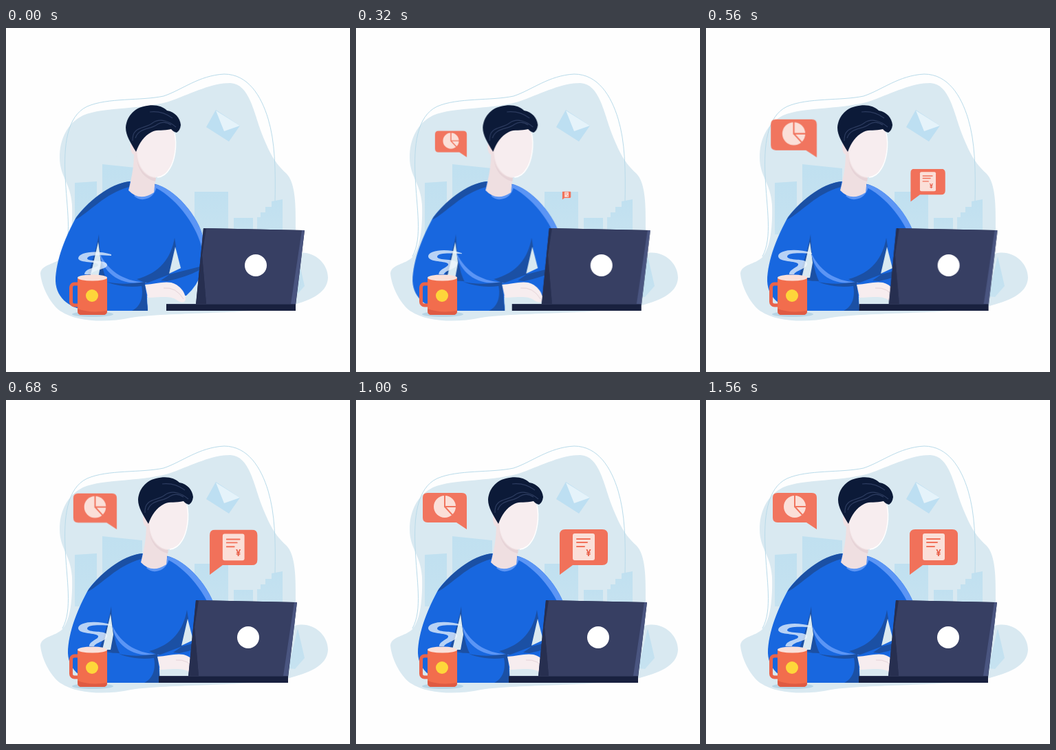
An HTML page that plays this animation: 500x500 px, repeating every 1.6 s.

```html
<!DOCTYPE html>
<html lang="en">
<head>
<meta charset="utf-8">
<title>Working at a laptop</title>
<style>
html, body { margin: 0; width: 100%; height: 100%; overflow: hidden; background: #fefefe; }
svg { display: block; width: 100%; height: 100%; }
.person, .laptop, .bubble, .steam { animation: 1600ms linear infinite; }
.person { animation-name: lean; }
.laptop { animation-name: slide; }
.chart { animation-name: popChart; transform-origin: 161px 187px; }
.bill { animation-name: popBill; transform-origin: 300.5px 248.5px; }
.steam { animation-name: drift; }
@keyframes lean {
  0% { transform: none; animation-timing-function: cubic-bezier(.3, .15, .6, 1); }
  42.5%, 100% { transform: translateX(18px); }
}
@keyframes slide {
  0% { transform: none; animation-timing-function: cubic-bezier(.3, .15, .6, 1); }
  42.5%, 100% { transform: translateX(-11px); }
}
@keyframes popChart {
  0% { transform: scale(0); }
  30.6% { transform: scale(1.1); }
  40% { transform: scale(.98); }
  47.5%, 100% { transform: none; }
}
@keyframes popBill {
  0%, 15% { transform: scale(0); }
  45.6% { transform: scale(1.1); }
  55% { transform: scale(.98); }
  62.5%, 100% { transform: none; }
}
@keyframes drift {
  0%, 100% { d: path("M153 329C130 322 105 326 105 335C107 342 132 339 134 344C135 349 115 348 114 358L124 358C126 351 148 351 147 344C146 336 118 340 118 335C119 329 138 330 153 331Z"); }
  22%, 88% { d: path("M154 327C130 319 104 323 105 332C106 341 132 338 134 343C135 348 121 350 121 358L128 358C130 352 148 350 147 342C146 334 118 339 118 332C119 326 138 327 154 328Z"); }
}
</style>
</head>
<body>
<svg viewBox="0 0 500 500">
  <defs>
    <linearGradient id="tower" x1="0" y1="0" x2="0" y2="1">
      <stop offset="0" stop-color="#c0e0f0"/>
      <stop offset="1" stop-color="#c6e2f0"/>
    </linearGradient>
  </defs>

  <!-- backdrop -->
  <path fill="#d9e9f1" d="M78 188C78 163 88 139 112 127C142 114 204 119 242 105C272 94 299 80 326 80C354 81 360 123 372 154C384 184 391 196 407 211C422 225 421 263 421 292L420 328C444 321 468 340 468 363C467 386 441 397 408 405C350 416 235 413 182 421C145 429 103 427 80 412C66 403 52 378 50 357C51 343 72 344 82 333C94 319 97 287 96 257C94 225 78 216 78 188Z"/>
  <path fill="none" stroke="#b9dbea" d="M82 332C97 305 88 262 86 214C84 172 88 128 118 114C148 101 196 106 229 99C256 90 280 69 317 67C352 67 371 99 381 132C391 165 392 205 391 252"/>
  <g fill="url(#tower)">
    <path d="M100 225L132 223V300H100Z"/>
    <path d="M140 198L198 204V290H140Z"/>
    <path d="M274 238H323V300H274Z"/>
    <path d="M331 276H359V300H331Z"/>
    <path d="M365 275H370V268H377V260H386V252L402 249V300H365Z"/>
    <path d="M424 332L434 375L420 391L410 390Z"/>
  </g>
  <path fill="#bddff2" d="M305 119L340 142L324 165L291 144Z"/>
  <path fill="#e5f3fa" d="M305 120L340 142L317 150Z"/>

  <g class="person">
    <!-- sweater -->
    <path fill="#1867df" d="M180 223C156 225 119 252 102 275C88 300 72 337 72 368C73 394 95 409 122 411H206L205 392L262 389Q279 374 284 354L287 306C280 274 246 233 214 226Z"/>
    <path fill="#1b50a4" d="M180 223C150 226 117 253 100 279C122 268 142 241 179 231Z"/>
    <path fill="#5b95f5" d="M217 227C246 234 280 274 287 306L285 322C280 293 251 249 217 232Z"/>
    <path fill="#1b50a4" d="M245 305C240 334 224 356 190 365L204 371L238 358L247 318Z"/>
    <path fill="#1b50a4" d="M281 347L238 358L225 367L234 368Q262 362 281 352Z"/>
    <path fill="#d9e9f1" d="M246 318L254 349L237 357Z"/>
    <path fill="#1b50a4" d="M135 300C131 322 124 344 117 364L148 370C139 352 136 328 135 300Z"/>
    <path fill="#d9e9f1" d="M134 311L138 341L134 363H122Z"/>
    <path fill="#5b95f5" d="M136 327C141 360 172 376 206 370C176 369 150 357 136 327Z"/>
    <path fill="#1867df" d="M108 371C139 363 166 373 202 370L206 411H122Z"/>
    <path fill="#1b50a4" d="M146 369C170 374 185 371 202 369L206 411H183C196 405 200 390 197 375C182 377 164 376 146 369Z"/>

    <!-- hand -->
    <path fill="#d9e9f1" d="M205 389H262L270 403H206Z"/>
    <path fill="#f7edef" d="M202 373C216 372 229 368 240 370C252 373 261 384 261 394C260 400 255 400 249 396C240 389 229 391 206 392Z"/>
    <path fill="none" stroke="#e5d3d8" d="M229 378Q247 376 258 394"/>

    <!-- head -->
    <path fill="#5b95f5" d="M186 244Q192 250 200 249Q215 247 219 231L214 226Z"/>
    <path fill="#efdfe1" d="M185 166C188 195 183 215 178 236Q194 253 215 239L218 210L193 168Z"/>
    <ellipse cx="186" cy="173" rx="5" ry="11" fill="#f0e0e3"/>
    <path fill="#e6d3d7" d="M190 190C193 207 207 219 218 218L217 223C201 219 192 207 190 190Z"/>
    <path fill="#f7edef" d="M191 170C196 151 218 143 243 148C249 163 247 184 240 201C235 212 227 217 218 217C201 217 187 196 191 170Z"/>
    <path fill="none" stroke="#fff" stroke-width="1.500" d="M245 153C249 171 245 193 238 204Q231 216 220 217"/>
    <path fill="#0c1a38" d="M189 180C181 167 174 156 174 145C175 129 186 117 200 114C215 110 227 113 234 120C246 122 253 131 254 141Q253 149 248 152Q243 151 240 147C229 150 220 147 212 151C200 157 194 167 189 180Z"/>
    <g fill="none" stroke="#2d3c60" stroke-width="1.200">
      <path d="M184 164C183 142 202 147 213 138C224 130 238 136 247 144"/>
      <path d="M188 160C193 144 211 148 220 140Q230 134 240 141"/>
      <path d="M209 122Q227 120 242 131"/>
    </g>
  </g>

  <g class="laptop">
    <path fill="#272f50" d="M287 291L434 294L421 403H276Z"/>
    <path fill="#4a5580" d="M429 294H434L421 401H412Z"/>
    <path fill="#373f63" d="M290 291L430 294L414 401H291L285 330Z"/>
    <path fill="#272f50" d="M287 291L291 292L285 330L291 401H276Z"/>
    <path fill="#19213f" d="M233 401H421V411H233Z"/>
    <path fill="#2b3455" d="M233 401H421V402H233Z"/>
    <circle cx="363" cy="345" r="16" fill="#fff"/>
  </g>

  <!-- mug -->
  <ellipse cx="126" cy="416" rx="30" ry="4" fill="#b8d5e5"/>
  <rect x="94.500" y="372" width="20" height="31" rx="5" fill="none" stroke="#e9634a" stroke-width="5"/>
  <path fill="#f26d4d" d="M104 363H147V411Q147 417 141 417H110Q104 417 104 411Z"/>
  <path fill="#df5b43" d="M104 408Q122 415 147 411Q147 417 141 417H110Q104 417 104 411Z"/>
  <ellipse cx="125.500" cy="363" rx="21.500" ry="4.500" fill="#fae0d9"/>
  <circle cx="125" cy="389" r="9" fill="#fed63a"/>
  <path class="steam" fill="#eef6fd" fill-opacity=".75" d="M153 329C130 322 105 326 105 335C107 342 132 339 134 344C135 349 115 348 114 358L124 358C126 351 148 351 147 344C146 336 118 340 118 335C119 329 138 330 153 331Z"/>

  <g class="bubble chart">
    <path fill="#f1755f" d="M104 135H154Q161 135 161 142V188L146 178H104Q97 178 97 171V142Q97 135 104 135Z"/>
    <circle cx="129" cy="155" r="16" fill="#fbdfd8"/>
    <path fill="none" stroke="#f1755f" stroke-width="2" d="M129 138V155H146M129 155L140 167"/>
  </g>

  <g class="bubble bill">
    <path fill="#f1715a" d="M304 188H358Q366 188 366 196V232Q366 240 358 240H315L296 254V196Q296 188 304 188Z"/>
    <rect x="315" y="194" width="32" height="39" rx="3" fill="#fbdfd8"/>
    <path stroke="#f1715a" stroke-width="2" stroke-linecap="round" d="M321 202H340M321 207H336M321 213H332"/>
    <text x="338" y="227" text-anchor="middle" fill="#e85f49" font-family="Inter, sans-serif" font-size="13" font-weight="700">¥</text>
  </g>
</svg>
</body>
</html>
```
